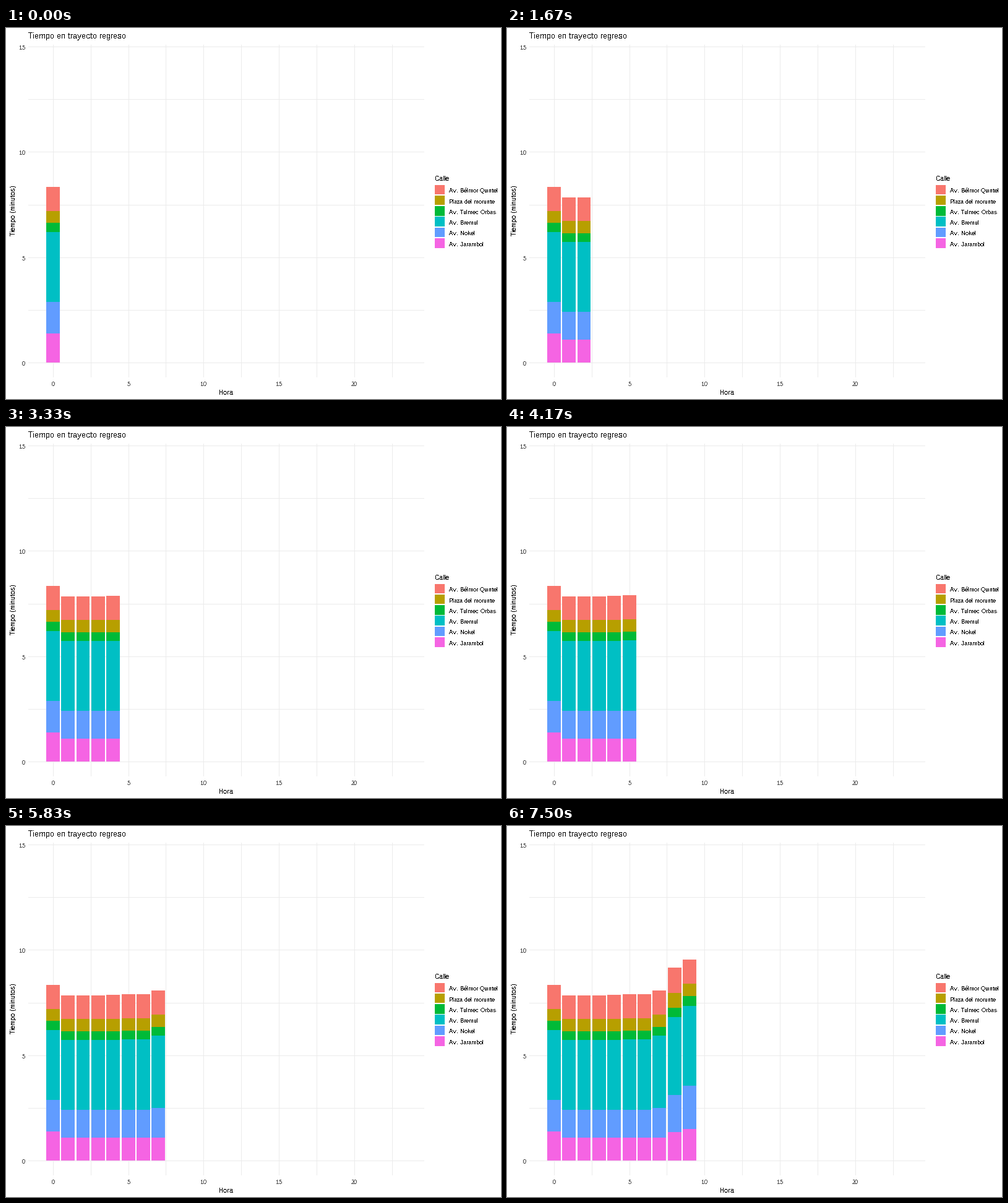
Write a matplotlib script that moves like this. It is 800 px wide and 600 px high and loops after 8000 ms.

```python
import matplotlib as mpl
import matplotlib.pyplot as plt
from matplotlib.animation import FuncAnimation
from matplotlib.patches import Rectangle

WIDTH, HEIGHT, DPI = 800, 600, 100
LOOP, INTERVAL = 8000, 25
STEP = 2500 / 3            # ms between two bars

# Crisp, fully hinted text without kerning
mpl.rcParams.update({
    "font.family": "Liberation Sans",
    "text.hinting": "native",
    "text.hinting_factor": 1,
    "text.kerning_factor": 6,
    "text.antialiased": False,
    "toolbar": "None",
})

STREETS = [
    ("Av. Bélmor Quintel", "#F8766D"),
    ("Plaza del morunte", "#B79F00"),
    ("Av. Tulmec Orbas", "#00BA38"),
    ("Av. Bremul", "#00BFC4"),
    ("Av. Nokel", "#619CFF"),
    ("Av. Jarambol", "#F564E3"),
]

# Upper edge of each segment in pixels, from the top street down
EARLY = (274, 312, 332, 346, 459, 504)
DAWN = (272, 311, 331, 345, 459, 504)
TOPS = [
    (257, 296, 315, 330, 443, 494),
    EARLY, EARLY, EARLY,
    (273,) + EARLY[1:],
    DAWN, DAWN,
    (266, 305, 325, 339, 456, 504),
    (229, 270, 294, 309, 435, 495),
    (216, 255, 275, 291, 420, 490),
]

LEFT, RIGHT, TOP, BOTTOM = 36, 676, 27, 565
BASE = 541
HALF_BAR = 10.96
GRID, TICK = "#EBEBEB", "#4D4D4D"

fig = plt.figure(figsize=(WIDTH / DPI, HEIGHT / DPI), dpi=DPI, facecolor="white")
ax = fig.add_axes([0, 0, 1, 1])
ax.set_xlim(0, WIDTH)
ax.set_ylim(HEIGHT, 0)
ax.axis("off")


def hour_x(hour):
    return 75.76 + 24.36 * hour


def minute_y(minutes):
    return round(541.1 - 34.07 * minutes)


def box(x0, y0, x1, y1, color):
    return ax.add_patch(Rectangle((x0, y0), x1 - x0, y1 - y0, facecolor=color,
                                  edgecolor="none", linewidth=0, antialiased=False))


def label(x, y, text, px, color="black", ha="left", **kw):
    ax.text(x, y, text, fontsize=px * 72 / DPI, color=color,
            ha=ha, va="baseline", **kw)


def draw_grid():
    for i in range(7):
        y = minute_y(2.5 * i)
        box(LEFT, y, RIGHT, y + 1, GRID)
        if i % 2 == 0:
            label(31, y + 5, f"{5 * i // 2}", 9, TICK, "right")
    for i in range(10):
        x = round(hour_x(2.5 * i))
        box(x, TOP, x + 1, BOTTOM, GRID)
        if i % 2 == 0:
            label(x, 579, f"{5 * i // 2}", 9, TICK, "center")


def draw_legend():
    label(693, 247, "Calle", 11)
    for i, (name, color) in enumerate(STREETS):
        y = 253.6 + 17.28 * i
        box(693, round(y), 709, round(y + 15.6), color)
        label(716, round(y + 12.7), name, 9)


def make_bar(hour, tops):
    x0 = round(hour_x(hour) - HALF_BAR)
    x1 = round(hour_x(hour) + HALF_BAR)
    ends = tops[1:] + (BASE,)
    return [box(x0, y0, x1, y1, color)
            for y0, y1, (_, color) in zip(tops, ends, STREETS)]


draw_grid()
draw_legend()
label(36, 17, "Tiempo en trayecto regreso", 13)
label(355.5, 593, "Hora", 11, ha="center")
label(15, 295, "Tiempo (minutos)", 11, ha="center",
      rotation=90, rotation_mode="anchor")
bars = [make_bar(hour, tops) for hour, tops in enumerate(TOPS)]


def update(frame):
    last = int((frame * INTERVAL + 20) // STEP)
    for hour, segments in enumerate(bars):
        for segment in segments:
            segment.set_visible(hour <= last)
    return [segment for segments in bars for segment in segments]


anim = FuncAnimation(fig, update, frames=LOOP // INTERVAL, interval=INTERVAL,
                     repeat=True, repeat_delay=0, blit=False)
plt.show()
```
